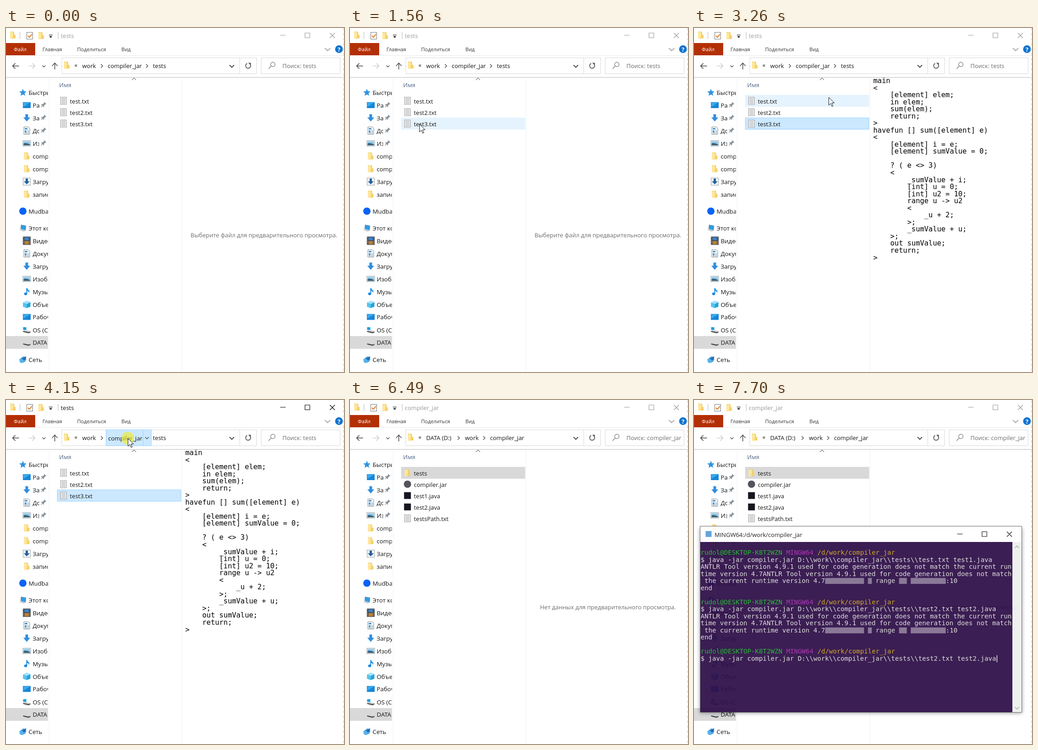
Recreate the animation shown at these times as an HTML page. Size 741 px wide and 756 px high, loop 8 s.

```html
<!DOCTYPE html>
<html lang="ru">
<head>
<meta charset="utf-8">
<title>Explorer and terminal</title>
<style>
  html, body { margin: 0; width: 100%; height: 100%; overflow: hidden; background: #fff; }
  svg { display: block; width: 741px; height: 756px; }
  text { font: 13px "Open Sans", "Noto Sans", sans-serif; fill: #161616; white-space: pre; }
  .tab text { font-size: 11px; fill: #333; }
  .side text { font-size: 13.3px; }
  text.dim { fill: #6d6d6d; }
  .mid { text-anchor: middle; }
  .code text { font: 15.47px "DejaVu Sans Mono", "Noto Sans Mono", monospace; fill: #000; }
  .term text { font: 14.17px "DejaVu Sans Mono", "Noto Sans Mono", monospace; fill: #dedede; }
</style>
</head>
<body>
<svg id="stage" viewBox="0 0 741 756" xmlns="http://www.w3.org/2000/svg"></svg>
<script>
const LOOP = 8000, STEP = 70;
const SELECT = 1630, LOADED = 1700, PRESS = 4150, OPEN = 4220, EMPTY = 4290, BLUR = 6490, CONSOLE = 6550;

const esc = s => s.replace(/&/g, '&amp;').replace(/</g, '&lt;').replace(/>/g, '&gt;');
const text = (x, y, s, attrs = '') => `<text x="${x}" y="${y}" ${attrs}>${esc(s)}</text>`;
const rect = (x, y, w, h, fill, attrs = '') =>
  `<rect x="${x}" y="${y}" width="${w}" height="${h}" fill="${fill}" ${attrs}/>`;
const path = (d, fill, attrs = '') => `<path d="${d}" fill="${fill}" ${attrs}/>`;
const line = (d, color, w = 1, attrs = '') => path(d, 'none', `stroke="${color}" stroke-width="${w}" ${attrs}`);
const at = (x, y, body) => `<g transform="translate(${x} ${y})">${body}</g>`;
const group = (id, body, attrs = '') => `<g id="${id}" ${attrs}>${body}</g>`;
const chevron = (x, y, turn, r, color, w = 1.3) =>
  `<g transform="translate(${x} ${y}) rotate(${turn})">${line(`M${-r / 2} ${-r}L${r / 2} 0L${-r / 2} ${r}`, color, w)}</g>`;

// Icons: each drawn around its own centre
const icons = {
  folder: path('M-6-8h8l1 2v13h-9z', '#f3c95c') + path('M-6-7h7v14l-7 1z', '#ffe79c') + path('M1-1h5v8H-1z', '#f6d06b'),
  sheet: rect(-6.5, -8, 13, 16, '#f7f7f7', 'stroke="#909090" stroke-width=".9"') +
    line('M-4.5-5.5h9m-9 2.2h9m-9 2.2h9m-9 2.2h9m-9 2.2h9m-9 2.2h9', '#a6a6a6', .9),
  star: path('M0-8L2.2-2.6 8-2 3.7 1.8 5 7.5 0 4.5-5 7.5-3.7 1.8-8-2-2.2-2.6z', '#2f94e0'),
  desktop: rect(-8.5, -6.5, 17, 13, '#1585d8') + path('M-7.5-5.5h15L-7.5 4z', '#36a9f2'),
  down: path('M-3-8h6v7h4.5L0 8-7.5-1H-3z', '#2f8fe0'),
  paper: path('M-6.5-8H4l2.5 2.5V8h-13z', '#fff', 'stroke="#7d8790"') + rect(-4.5, -5.5, 6, 3, '#3b8fc9') +
    rect(-4.5, -.5, 4, 5, '#4f9bd0') + line('M1 0h4M1 2h4M1 4h4M-4.5 6h9', '#7a99ae', .9),
  picture: rect(-8.5, -6, 17, 12, '#fff', 'stroke="#8d979e"') + rect(-7, -4.5, 14, 9, '#8cc9f0') +
    path('M-7 0q5-2 14 2v2.5H-7z', '#3c6378'),
  box: rect(-8, -8, 16, 16, '#f4f6f7', 'stroke="#9aa4aa"') + path('M-2.5-6.5h5v6h4L0 6-6.5-.5h4z', '#24609f'),
  pc: path('M-4-7L7-5 6 5-5 2z', '#2e9be6', 'stroke="#8fa4b2"') + path('M-8 4l4-2L6 6 2 8z', '#c0cbd2'),
  film: rect(-8.5, -9, 17, 18, '#26282b') + rect(-5, -8, 10, 7.5, '#3d7fc4') + rect(-5, .5, 10, 7.5, '#b8803e') +
    line('M-6.8-8v17M6.8-8v17', '#e8e8e8', 1.6, 'stroke-dasharray="1.6 1.6"'),
  music: path('M-1-8h2q1 4 4 5 2 3-1 6 1-4-3-5v7a3.5 3 0 1 1-2-3z', '#1b8be0'),
  cube: path('M-8-4L0-8 8-5V5L0 8-8 5z', '#25a3dc') + path('M-8-4L0-1V8l-8-3z', '#55c6ef') + path('M-8-4L0-8 8-5 0-1z', '#a3e3f8'),
  drive: path('M-8 2L4 4.5 8 3v2.5L4 7.5-8 4.5z', '#4a4e52') + path('M-8 2l5-3L8 3 4 4.5z', '#d3d6d8'),
  net: path('M-8 0L1-7 7-5 6 4-2 8z', '#3d9be0') + path('M-4-3L7-7v8L-2 4z', '#1b6fb8', 'stroke="#a8c4d8"') +
    `<circle cx="-3" cy="3" r="4.5" fill="#58b5ea"/>`,
  cloud: `<circle r="8" fill="#0b63f6"/>`,
  archive: `<circle r="8" fill="#55545c"/>`,
  java: rect(-7.5, -7.5, 15, 15, '#17151f'),
  pin: `<g transform="rotate(45)">${path('M-3-6h6v1.5h-1V0l2 2v1H.7v4h-1.4V3H-4V2l2-2v-4.5h-1z', '#87929b')}</g>`
};
icons.system = icons.drive + rect(-8, -6, 7, 6, '#18a0e8');
const icon = (name, x, y) => at(x, y, icons[name]);

const winButtons = (x0, x1, x2, y) =>
  line(`M${x0} ${y}h12M${x1 + .5} ${y - 5}h10.5v10.5h-10.5zM${x2} ${y - 5}l11 11m0-11l-11 11`, 'currentColor', 1.1);

function titleBar() {
  return icon('folder', 15, 16) + line('M30.5 9v15M114.5 9v15', '#b5b5b5') +
    rect(45.5, 9.5, 13, 15, '#fff', 'stroke="#777"') + line('M48 17l3 3.5 6-7', '#e07b1a', 2) +
    icon('folder', 77, 17) + line('M94 15.5h8', '#222', 1.2) + path('M94.5 18h7l-3.5 4z', '#222') +
    text(120, 21.5, '', 'id="title"') +
    group('buttons', winButtons(601, 655, 710, 16));
}

function ribbon() {
  const tabs = [[80, 'Главная'], [156, 'Поделиться'], [253, 'Вид']];
  return `<g class="tab">${tabs.map(([x, s]) => text(x, 51, s)).join('')}${line('M64 60.5H741', '#e9e9e9')}
    ${rect(0, 33, 64, 27, '#b32f05')}${text(17, 51, 'Файл', 'style="fill:#fff"')}</g>` +
    chevron(705, 47, 90, 6, '#8c8c8c', 1.4) + `<circle cx="730" cy="46.5" r="8.5" fill="#0f74d1"/>` +
    text(730, 51.5, '?', 'class="mid" style="fill:#fff;font-weight:700"');
}

function addressBar() {
  const box = 'stroke="#d9d9d9"';
  return line('M28.5 83.5H15m5.5-6L14.5 83.5l6 6', '#444', 1.6) + line('M50 83.5h13.5m-6-6l6 6-6 6', '#d0d0d0', 1.6) +
    chevron(83, 84, 90, 3.4, '#555', 1.5) + line('M107 91V77m-6 6.5l6-6.5 6 6.5', '#555', 1.6) +
    rect(122.5, 65.5, 427, 35, '#fff', box) + line('M512.5 65v35', '#d9d9d9') +
    rect(559.5, 65.5, 173, 35, '#fff', box) + icon('folder', 133, 82) +
    group('pressed', rect(219.5, 65.5, 99, 35, '#cce8ff', 'stroke="#99d1ff"') + line('M300.5 66v34', '#99d1ff')) +
    group('workHover', rect(248.5, 65.5, 55, 35, '#e5f3ff', 'stroke="#cce8ff"') + line('M285.5 66v34', '#cce8ff')) +
    text(150, 86, '«') +
    group('crumbsA', text(167, 87.5, 'work') + chevron(210, 83.5, 0, 4, '#555', 1.5) +
      text(223, 87.5, 'compiler_jar', 'id="crumb"') + group('crumbArrow', chevron(0, 0, 0, 4, '#555', 1.5)) +
      text(322, 87.5, 'tests')) +
    group('crumbsB', text(167, 87.5, 'DATA (D:)') + chevron(238, 83.5, 0, 4, '#555', 1.5) + text(252, 87.5, 'work') +
      chevron(294, 83.5, 0, 4, '#555', 1.5) + text(307, 87.5, 'compiler_jar') +
      group('lastArrow', chevron(394, 83.5, 0, 4, '#555', 1.5))) +
    chevron(495, 84, 90, 5, '#444', 1.8) +
    line('M535.2 79.5a5.5 5.5 0 1 1-6.5-1.6', '#555', 1.8) + path('M531 76.5h5.8v5.8z', '#555') +
    `<circle cx="585" cy="80" r="4.8" fill="none" stroke="#777" stroke-width="1.2"/>` + line('M581.5 83.5l-6 6', '#777', 1.3) +
    text(606, 88, '', 'id="search" class="dim"') + line('M0 108.5H741', '#b9b9b9');
}

function sidebar() {
  const items = [
    ['star', 142, 'Быстрый', 1], ['desktop', 170, 'Рабочий', 0, 1], ['down', 198, 'Загрузки', 0, 1],
    ['paper', 226, 'Документы', 0, 1], ['picture', 254, 'Изображения', 0, 1], ['folder', 282, 'compiler'],
    ['folder', 310, 'compiler'], ['box', 338, 'Загрузки'], ['folder', 366, 'записи'], ['cloud', 403, 'Mudbarn', 1],
    ['pc', 440, 'Этот компьютер', 1], ['film', 468, 'Видео'], ['paper', 496, 'Документы'], ['down', 524, 'Загрузки'],
    ['picture', 552, 'Изображения'], ['music', 580, 'Музыка'], ['cube', 608, 'Объемные'], ['desktop', 635.5, 'Рабочий'],
    ['system', 664, 'OS (C:)'], ['drive', 691.5, 'DATA (D:)'], ['net', 729, 'Сеть', 1]];
  return rect(0, 677, 92, 28, '#d9d9d9') + items.map(([name, y, label, top, pinned]) =>
    icon(name, top ? 37 : 45.5, y - .5) +
    `<g class="side" clip-path="url(#${pinned ? 'short' : 'side'})">${text(top ? 49.5 : 58.5, y + 4.7, label)}</g>` +
    (pinned ? icon('pin', 82, y - 1) : '')).join('') +
    line('M94.5 109V756M385.5 109V756', '#f0f0f0');
}

const LIST_Y = 147, LIST_ROW = 24.9;
const rowY = i => Math.round(LIST_Y + i * LIST_ROW);
const fileRow = ([name, label], i) => icon(name, 126, rowY(i) + 13) + text(140, rowY(i) + 19, label);
const listA = [['sheet', 'test.txt'], ['sheet', 'test2.txt'], ['sheet', 'test3.txt']];
const listB = [['folder', 'tests'], ['archive', 'compiler.jar'], ['java', 'test1.java'], ['java', 'test2.java'], ['sheet', 'testsPath.txt']];

const program = `main
<
    [element] elem;
    in elem;
    sum(elem);
    return;
>
havefun [] sum([element] e)
<
    [element] i = e;
    [element] sumValue = 0;

    ? ( e <> 3)
    <
        _sumValue + i;
        [int] u = 0;
        [int] u2 = 10;
        range u -> u2
        <
            _u + 2;
        >;
        _sumValue + u;
    >;
    out sumValue;
    return;
>`;

function files() {
  return rect(96, 109, 288, 32, '#d9ebf9', 'id="headHover"') + chevron(280.5, 112, -90, 4.5, '#777', 1.1) +
    text(116.5, 130, 'Имя', 'style="fill:#56698a"') +
    rect(112, 0, 272, 26, '#e5f3ff', 'id="hover"') + rect(112.5, 0, 271, 25, '#cce8ff', 'id="selected"') +
    group('listA', listA.map(fileRow).join('')) + group('listB', listB.map(fileRow).join('')) +
    text(565.5, 460, 'Выберите файл для предварительного просмотра.', 'id="hintA" class="mid dim"') +
    text(565.5, 460, 'Нет данных для предварительного просмотра.', 'id="hintB" class="mid dim"') +
    group('code', program.split('\n').map((s, i) => text(393, 121 + i * 15.54, s)).join(''), 'class="code"');
}

const CELL = 8.53, ROW = 15.53;
function terminal() {
  const put = (col, row, s, attrs) => text(14.5 + col * CELL, 340 + row * ROW, s, attrs);
  const tint = c => `style="fill:${c}"`;
  const command = n => `$ java -jar compiler.jar D:\\\\work\\\\compiler_jar\\\\tests\\\\test${n > 1 ? n : ''}.txt test${n}.java`;
  const prompt = row => put(0, row, 'rudol@DESKTOP-K8T2WZN', tint('#27bb35')) +
    put(22, row, 'MINGW64', tint('#ad37b4')) + put(30, row, '/d/work/compiler_jar', tint('#cfa928'));
  const shade = (col, n, row) => rect(14.5 + col * CELL, 329 + row * ROW, n * CELL, 13, 'url(#dots)');
  const run = (row, n) => prompt(row) + put(0, row + 1, command(n)) +
    put(0, row + 2, 'ANTLR Tool version 4.9.1 used for code generation does not match the current run') +
    put(0, row + 3, 'time version 4.7ANTLR Tool version 4.9.1 used for code generation does not match') +
    put(1, row + 4, 'the current runtime version 4.7') + put(45, row + 4, 'range') + put(63, row + 4, ':10') +
    [[32, 10], [43, 1], [51, 2], [54, 9]].map(([c, w]) => shade(c, w, row + 4)).join('') + put(0, row + 5, 'end');
  return `<g clip-path="url(#outside)">${rect(13, 281, 706, 407, '#000', 'opacity=".4" filter="url(#soft)"')}</g>
    <g opacity=".94">${rect(13.5, 277.5, 705, 409, '#fff', 'stroke="#6b6b6b"')}
    ${rect(14, 312, 684, 374, '#2f1049')}${rect(698, 312, 20, 374, '#f0f0f0')}
    ${chevron(708, 323, -90, 4.5, '#a8a8a8', 1.6)}${chevron(708, 677, 90, 4.5, '#a8a8a8', 1.6)}
    ${rect(25.5, 288, 13, 13, '#5c9fd8')}${text(45, 300.5, 'MINGW64:/d/work/compiler_jar')}
    ${winButtons(577, 631, 686, 294.5)}</g>
    <g class="term">${run(0, 1)}${run(7, 2)}${prompt(14)}${put(0, 15, '$')}
    ${group('typed', put(2, 15, command(2).slice(2)))}${rect(0, 561, 1.5, 15.5, '#e4e4e4', 'id="caret"')}</g>`;
}

const stage = document.getElementById('stage');
stage.innerHTML = `<defs>
  <clipPath id="side"><rect y="109" width="92" height="647"/></clipPath>
  <clipPath id="short"><rect y="109" width="73" height="647"/></clipPath>
  <clipPath id="outside"><path clip-rule="evenodd" d="M0 0H741V756H0zM13 277H719V687H13z"/></clipPath>
  <filter id="soft" x="-10%" y="-10%" width="120%" height="120%"><feGaussianBlur stdDeviation="4"/></filter>
  <pattern id="dots" width="2" height="2" patternUnits="userSpaceOnUse">
    <path d="M0 0h1v1h-1zM1 1h1v1h-1z" fill="#d8d4dc"/></pattern>
  </defs>` + rect(0, 0, 741, 756, '#fff') + titleBar() + ribbon() + addressBar() + sidebar() + files() +
  line('M740.5 0V756', '#c4c4c4', 1, 'stroke-dasharray="6 5"') + group('console', terminal()) +
  `<circle id="click" r="14" fill="#f0ea28" opacity=".64"/>` +
  group('arrow', path('M.5.5v17l4-3.8 2.8 6.6 2.6-1.1-2.8-6.5h5.5z', '#fff', 'stroke="#111"')) +
  group('beam', line('M-3.5-8h2.5l1 1 1-1h2.5M0-7V7M-3.5 8h2.5l1-1 1 1h2.5', '#f2f2f2', 1.2));

const el = {};
stage.querySelectorAll('[id]').forEach(e => el[e.id] = e);
const show = (id, on) => el[id].style.display = on ? '' : 'none';
const move = (id, x, y) => el[id].setAttribute('transform', `translate(${x} ${y})`);
const within = (t, a, b) => t >= a && t < b;

// Pointer trips: start, last step, from, to, eased
const trips = [
  [390, 530, 627, 393, 414, 348, 0], [860, 1560, 414, 348, 152, 211, 1], [2560, 2840, 152, 211, 294, 276, 1],
  [3120, 3260, 294, 276, 295, 152, 1], [3330, 3880, 295, 152, 267, 84, 1], [4550, 4690, 267, 84, 442, 815, 0],
  [6810, 7240, 475, 754, 420, 598, 0]];

function pointer(t) {
  const trip = trips.filter(s => t >= s[0]).pop();
  if (!trip) return [-99, -99];
  const [t0, t1, x0, y0, x1, y1, eased] = trip;
  const k = Math.min(1, (Math.floor((t - t0) / STEP) + 1) / (Math.round((t1 - t0) / STEP) + 1));
  const e = eased ? k * k * (3 - 2 * k) : k;
  return [Math.round(x0 + (x1 - x0) * e), Math.round(y0 + (y1 - y0) * e)];
}

function render(t) {
  const inJar = t >= OPEN, active = within(t, PRESS, BLUR), down = within(t, PRESS, OPEN);
  const [x, y] = pointer(t);
  const visible = within(t, 390, 4690) || within(t, 6810, 7600);

  el.title.textContent = inJar ? 'compiler_jar' : 'tests';
  el.title.style.fill = active ? '#111' : '#999';
  el.buttons.style.color = active ? '#000' : '#999';
  el.search.textContent = 'Поиск: ' + el.title.textContent;

  show('crumbsA', !inJar);
  show('crumbsB', inJar);
  show('lastArrow', t < BLUR);
  show('pressed', down);
  move('crumb', down ? 1 : 0, down ? 1 : 0);
  el.crumbArrow.setAttribute('transform', `translate(309 83.5) rotate(${down ? 90 : 0})`);
  show('workHover', within(t, OPEN, 4830));
  el.workHover.setAttribute('opacity', t < 4690 ? 1 : .5);

  const row = Math.floor((y - LIST_Y) / LIST_ROW);
  const overList = visible && x >= 112 && x < 384;
  show('hover', !inJar && overList && row >= 0 && row < listA.length);
  el.hover.setAttribute('y', rowY(row));
  show('headHover', overList && y >= 109 && y < 141);
  show('selected', t >= SELECT);
  el.selected.setAttribute('y', rowY(inJar ? 0 : 2) + .5);
  el.selected.setAttribute('fill', t < BLUR ? '#cce8ff' : '#d9d9d9');
  el.selected.setAttribute('stroke', t < BLUR ? '#99d1ff' : '#d9d9d9');
  show('listA', !inJar);
  show('listB', inJar);
  show('hintA', t < SELECT);
  show('code', within(t, LOADED, OPEN));
  show('hintB', t >= EMPTY);

  show('console', t >= CONSOLE);
  show('typed', t >= 7600);
  show('caret', t < 7020 || t >= 7700);
  el.caret.setAttribute('x', t < 7600 ? 32 : 663.5);

  const overText = t >= CONSOLE && y < 686;
  show('arrow', visible && !overText);
  show('beam', visible && overText);
  show('click', within(t, SELECT, LOADED) || down);
  for (const id of ['arrow', 'beam', 'click']) move(id, x, y);
}

const start = performance.now();
function tick() {
  render((performance.now() - start) % LOOP);
  requestAnimationFrame(tick);
}
tick();
</script>
</body>
</html>
```
